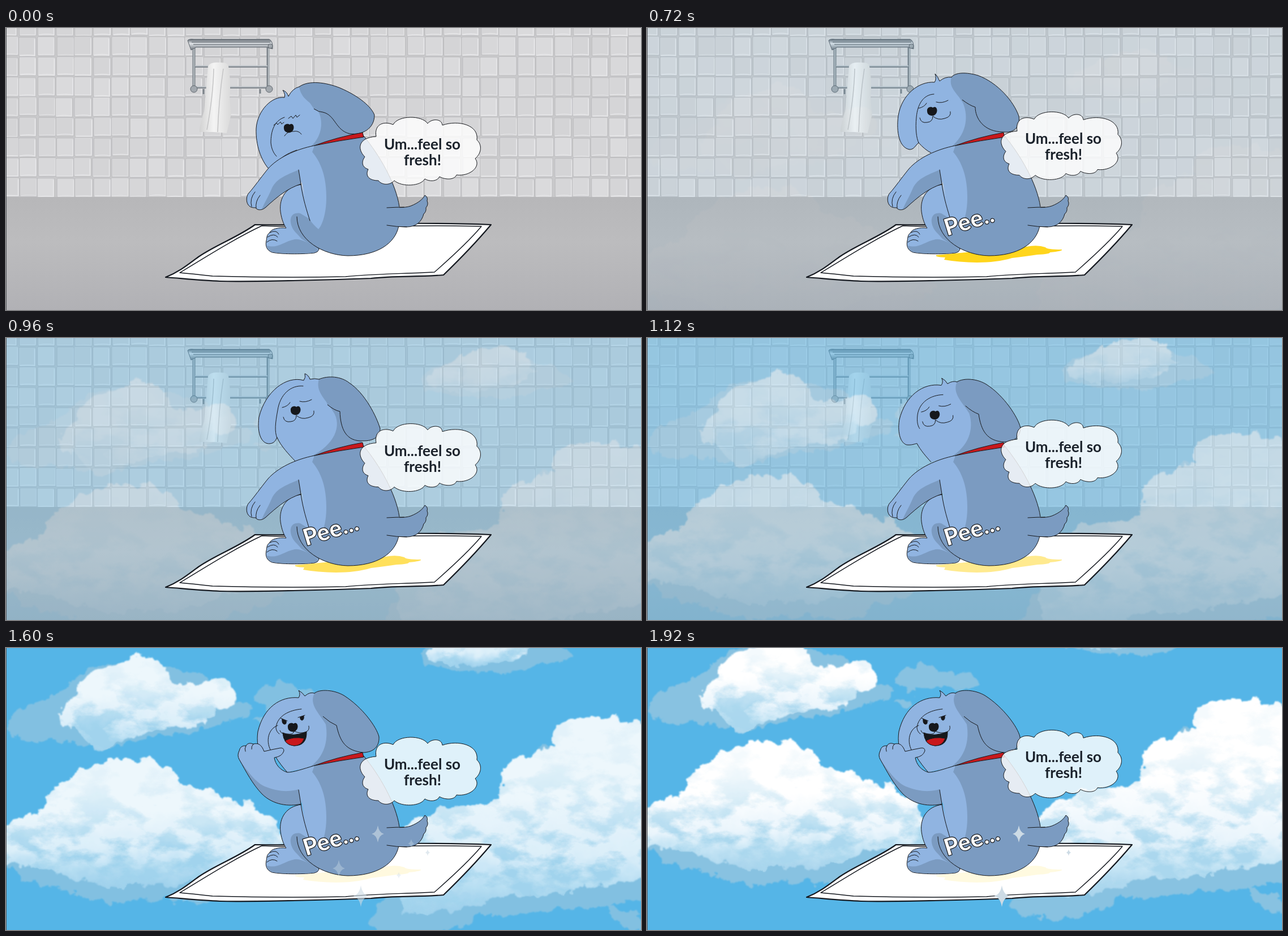
Write an HTML page that moves like this. It is 1122x499 px and loops after 2 s.

```html
<!DOCTYPE html>
<html lang="en">
<head>
<meta charset="utf-8">
<title>So fresh</title>
<style>
  html, body { margin: 0; width: 100%; height: 100%; overflow: hidden; background: #d8d8da; }
  svg { display: block; width: 100%; height: 100%; }
  text { font-family: Lato, "Open Sans", sans-serif; font-weight: 700; }
  .ink { fill: none; stroke: #16181c; stroke-width: 1; stroke-linecap: round; stroke-linejoin: round; }
  .light { fill: #90b4e1; }
  .dark { fill: #7b9bc1; }
  .both { stroke: #16181c; stroke-width: 1; stroke-linejoin: round; }
</style>
</head>
<body>
<svg viewBox="0 0 1122 499" preserveAspectRatio="none">
  <defs>
    <linearGradient id="floor" x1="0" y1="0" x2="0" y2="1">
      <stop offset="0" stop-color="#b7b7b9"/><stop offset=".4" stop-color="#bcbcbe"/><stop offset="1" stop-color="#b1b1b5"/>
    </linearGradient>
    <linearGradient id="chrome" x1="0" y1="0" x2="0" y2="1">
      <stop offset="0" stop-color="#5f666e"/><stop offset=".4" stop-color="#dfe3e7"/><stop offset="1" stop-color="#6d747c"/>
    </linearGradient>
    <linearGradient id="towel">
      <stop offset="0" stop-color="#d2d2d2"/><stop offset=".45" stop-color="#f4f4f4"/><stop offset="1" stop-color="#d9d9d9"/>
    </linearGradient>
    <linearGradient id="puff" x1="0" y1="0" x2="0" y2="1">
      <stop offset=".4" stop-color="#fff"/><stop offset=".7" stop-color="#eaf5fc"/><stop offset=".85" stop-color="#c2e3f4"/><stop offset="1" stop-color="#a6d3ec"/>
    </linearGradient>
    <linearGradient id="depth" x1="0" y1="0" x2="0" y2="1">
      <stop offset=".2" stop-opacity=".12"/><stop offset=".5" stop-opacity=".45"/><stop offset=".75" stop-opacity=".95"/>
    </linearGradient>
    <filter id="fluff" x="-10%" y="-20%" width="120%" height="140%" color-interpolation-filters="sRGB">
      <feTurbulence type="fractalNoise" baseFrequency=".045" numOctaves="4" seed="7"/>
      <feDisplacementMap in="SourceGraphic" scale="26" xChannelSelector="R" yChannelSelector="G"/>
      <feGaussianBlur stdDeviation=".9"/>
    </filter>
    <!-- Billowing blue shadows, kept inside the same ragged edge -->
    <filter id="billow" x="-10%" y="-20%" width="120%" height="140%" color-interpolation-filters="sRGB">
      <feTurbulence type="fractalNoise" baseFrequency=".045" numOctaves="4" seed="7"/>
      <feDisplacementMap in="SourceGraphic" scale="26" xChannelSelector="R" yChannelSelector="G" result="shape"/>
      <feTurbulence type="fractalNoise" baseFrequency=".016 .026" numOctaves="5" seed="21"/>
      <feColorMatrix values="0 0 0 0 .66  0 0 0 0 .84  0 0 0 0 .93  5 0 0 0 -2.2"/>
      <feComposite in2="shape" operator="in"/>
    </filter>
    <g id="puffs">
      <path d="M92 98C90 70 125 60 125 35C150 5 180 15 200-10C235-30 280-15 290 20C310 40 330 35 355 25C390 10 415 55 405 72C385 80 370 75 350 105C310 115 280 100 250 122C210 115 200 140 165 152C145 145 145 125 92 98Z"/>
      <path d="M-30 285C20 265 55 270 70 245C80 205 120 210 135 180C175 170 195 160 220 165C260 165 295 175 305 205C320 225 355 200 372 230C400 250 430 230 450 255C480 265 480 290 510 345C470 365 420 345 370 365C330 390 270 395 230 385C180 405 130 370 100 375C50 345 10 360-30 345Z"/>
      <path d="M690 300C715 262 750 270 765 256C800 243 835 258 862 240C880 225 875 205 885 185C890 150 940 165 967 140C955 105 1000 90 1020 97C1060 80 1100 105 1150 105V370C1080 400 1040 375 1000 400C940 415 890 395 850 420C810 440 770 430 700 440Z"/>
      <path d="M745-22C770-55 830-80 890-78C940-65 910-35 940-30C900-10 850 5 800 0Q755-5 745-22Z"/>
    </g>
  </defs>

  <g id="room">
    <rect width="1122" height="300" fill="#c9c9cb"/>
    <g id="tiles"></g>
    <rect y="299" width="1122" height="200" fill="url(#floor)"/>
    <g fill="none" stroke="#7d848b" stroke-width="5">
      <path d="M332 34V108M463 34V108"/>
      <path d="M333 68H463M333 105H463" stroke-width="4"/>
      <path d="M349 108V117M449 108V116" stroke-width="3"/>
      <path d="M332 36V108M464 36V108M334 67H462M334 104H462" stroke="#d5dade" stroke-width="1.3"/>
    </g>
    <path d="M321 22Q323 19 332 20L465 20Q472 23 471 37L461 34H336L327 39Z" fill="url(#chrome)" stroke="#5d646c"/>
    <path d="M328 25H467M331 29H465" stroke="#4f565e" stroke-width="1"/>
    <g fill="#a2a8ae" stroke="#60676e"><circle cx="332" cy="108" r="6"/><circle cx="465" cy="108" r="6"/><circle cx="467" cy="32" r="4"/></g>
    <path d="M357 67Q362 60 374 61Q392 60 393 67Q398 95 395 125L398 152L390 186L366 184L342 184Q341 175 350 148Z" fill="url(#towel)"/>
    <path d="M367 72Q366 120 355 180M384 72Q376 125 374 184" fill="none" stroke="#c3c3c4" stroke-width="1.5"/>
  </g>

  <g id="sky">
    <rect width="1122" height="499" fill="#55b5e7"/>
    <g id="clouds">
      <g filter="url(#fluff)" fill="#88c2e1">
        <path d="M5 105C25 55 75 70 100 45C140 0 210-25 290 5C330 25 390 10 410 60C450 75 430 105 390 95C340 130 270 120 215 135C160 165 120 120 70 135C30 140 0 125 5 105Z"/>
        <path d="M445 50C460 20 500 20 520 40C560 40 595 55 590 72C550 78 500 60 470 80Q435 65 445 50ZM440 95Q460 80 470 95Q460 105 440 95Z"/>
        <path d="M-30 330H500C500 390 400 380 380 410C310 435 270 400 220 415C160 435 120 395 70 390C30 380-10 350-30 330Z"/>
        <path d="M850 250C910 210 920 150 965 140L1150 130V400C1080 420 1050 440 1000 430C930 430 880 450 840 440C800 475 700 490 650 465C630 440 690 420 700 300Z"/>
        <path d="M728-15C760-60 870-95 930-55C970-45 1000-30 1000-12C930 0 890 18 840 15C790 8 750 5 728-15Z"/>
        <path d="M1060 425Q1090 430 1122 445V470Q1080 465 1060 425Z"/>
      </g>
      <use href="#puffs" fill="url(#puff)" filter="url(#fluff)"/>
      <use href="#puffs" fill="url(#depth)" filter="url(#billow)"/>
    </g>
  </g>

  <g stroke="#14181f" stroke-linejoin="round">
    <path fill="#fff" stroke-width="2.2" d="M282 441C305 432 320 420 340 405C370 384 410 370 440 348C580 350 700 342 857 348C836 373 804 407 773 437C720 441 690 438 645 443C540 447 420 449 378 448C345 447 310 443 282 441Z"/>
    <path fill="none" stroke-width="1.4" d="M307 433C350 407 405 372 452 350C600 355 720 347 840 351C820 375 790 403 757 432C700 435 650 435 600 440C500 442 400 440 365 439Q330 435 307 433Z"/>
  </g>
  <path id="puddle" fill="#ffd51c" d="M511 402L670 387Q690 383 704 388Q706 392 733 392Q735 395 712 397Q712 400 690 401Q670 404 645 407C610 418 560 416 525 410L527 406Q508 405 511 402Z"/>

  <g>
    <path class="dark both" d="M673 318C690 317 703 319 715 315C730 309 737 302 740 296Q746 299 744 306Q747 312 742 318Q743 325 738 329C735 342 725 352 708 352Q690 352 673 349"/>
    <path class="light" id="head"/>
    <path class="dark" id="shade"/>
    <path class="dark both" id="ear"/>
    <path class="ink" id="headLine"/>
    <path class="ink" id="muzzle"/>
    <g id="face">
      <g id="strain" class="ink">
        <path d="M-27-5l5-4l2 3l5-5l2 4l4-3M-1-17l5-4l3 4l5-6l2 4l5-4"/>
        <path id="frown" d="M-8 14Q-2 5 8 6Q17 4 22 11"/>
        <path id="flat" d="M-9 15Q-1 9 6 9Q14 6 22 2"/>
      </g>
      <path id="happy" class="ink" d="M-24-5Q-14-7-10-14M7-16Q17-13 28-19M-22 12Q-20 22-9 20Q1 19 1 9Q10 17 22 13Q34 10 32 1"/>
      <g id="grin" class="ink">
        <path d="M-22-16L-10-11M9-17L21-21M-27-3C-49 5-49 38-30 52"/>
        <path fill="#16181c" d="M-19-14L-12-11Q-11-5-15-5Q-20-6-19-14ZM13-18L19-20Q20-13 16-12Q12-13 13-18ZM-18 10Q0 18 24 8Q25 33 2 33Q-17 31-18 10Z"/>
        <path fill="#c8181c" d="M-14 24Q0 16 20 20Q15 33 2 33Q-10 32-14 24Z"/>
        <path d="M-23 6Q-20 14-10 12Q1 14 2 7Q12 12 22 9Q30 6 28-2"/>
      </g>
      <path fill="#16181c" d="M-9 0C-10-7-2-9 1-6C6-10 10-4 8 2C6 8 0 9-2 8C-7 7-9 4-9 0Z"/>
    </g>

    <path class="light both" d="M522 277C496 280 482 300 485 325C487 340 492 350 495 354C482 352 468 356 466 362C460 366 461 372 460 376C458 385 460 393 470 397C490 401 530 400 545 398Q551 397 553 392L540 340"/>
    <path class="dark" d="M520 328C500 324 498 346 511 361Q518 368 522 373L552 392L540 340ZM461 385C480 391 490 378 510 374Q525 372 552 393Q548 398 535 398.500Q490 400 470 396.500Q462 393 461 385Z"/>
    <path class="ink" d="M466 362Q478 356 482 365M462 370Q474 362 480 370M461 379Q470 371 479 377"/>
    <path class="dark" d="M545 208Q590 200 632 191C660 225 689 275 695 316L694 350C688 382 655 403 604 403C560 402 514 375 514 334Q520 328 538 341L518 250Z"/>
    <path class="ink" d="M632 191C660 225 689 275 695 316M694 350C688 382 655 403 604 403C560 402 514 375 514 334"/>
    <path class="dark" d="M673 318.500H703V351.500Q690 352 673 349Z"/>
    <path class="ink" d="M673 318Q690 317 703 317M673 349Q690 352 708 352"/>
    <path class="light" d="M500 222L532 210C560 235 566 270 566 300C566 330 558 350 552 356Q543 348 538 341C530 310 524 280 518 250Z"/>
    <g id="armDown">
      <path class="light" d="M545 208C510 215 480 230 463 249C450 265 438 282 430 291C424 296 424 308 428 313C432 318 436 318 441 318C444 323 452 323 458 318C480 298 497 284 521 276L534 240Z"/>
      <path class="dark" d="M517 251C490 262 478 268 470 283C464 298 455 312 452 321Q458 320 462 315C480 298 497 284 521 276Z"/>
      <path class="ink" d="M545 208C510 215 480 230 463 249C450 265 438 282 430 291C424 296 424 308 428 313C432 318 436 318 441 318C444 323 452 323 458 318C480 298 497 284 521 276M440 290Q430 302 434 316M449 296Q440 307 442 319"/>
    </g>
    <g id="armUp">
      <path class="light" d="M545 208C525 214 508 220 497 220C484 216 476 206 474 194Q488 192 491 182Q491 176 484 177Q468 180 456 183C452 172 446 167 437 170Q428 166 424 173Q414 172 412 182Q408 190 412 197C425 220 435 240 452 258C472 278 500 281 521 276L534 240Z"/>
      <path class="dark" d="M414 200C430 222 443 240 460 246Q490 258 517 250L521 276C500 281 472 278 452 258Q432 236 414 200Z"/>
      <path class="ink" d="M545 208C525 214 508 220 497 220C484 216 476 206 474 194Q488 192 491 182Q491 176 484 177Q468 180 456 183C452 172 446 167 437 170Q428 166 424 173Q414 172 412 182Q408 190 412 197C425 220 435 240 452 258C472 278 500 281 521 276M424 173Q421 178 423 183M437 170Q433 174 434 179"/>
    </g>
    <path class="ink" d="M517 251L521 276C524 300 532 325 537 341"/>
    <path fill="#c8181c" class="both" d="M545 208Q585 193 630 185L632 193Q590 199 545 208Z"/>
  </g>

  <text id="pee" transform="translate(530 368) rotate(-17)" font-size="41" letter-spacing=".5" fill="#fff" stroke="#16181c" stroke-width="2.4" stroke-linejoin="round" paint-order="stroke"></text>
  <g id="sparkles" fill="#cddbe5"></g>
  <g id="bubble">
    <path fill="#fff" fill-opacity=".81" class="both" d="M654 192C650 170 668 164 684 171C693 154 735 154 745 169C752 160 770 160 771 172C800 162 836 172 832 198C842 207 840 222 829 231C840 245 820 263 796 260C792 270 774 268 766 263C762 272 748 272 740 267C733 280 700 282 686 270C678 279 664 278 658 270C642 270 634 262 640 250C628 246 628 236 634 228C620 214 622 194 654 192Z"/>
    <g font-size="26" fill="#1b222b" text-anchor="middle"><text x="735.500" y="215">Um...feel so</text><text x="736" y="243">fresh!</text></g>
  </g>
  <rect width="1" height="499" fill="#55585c"/>
</svg>
<script>
const LOOP = 2000, STEP = 80;
const $ = id => document.getElementById(id);
const clamp = v => Math.max(0, Math.min(1, v));
const mix = (a, b, k) => a + (b - a) * k;

// Slightly uneven glazed wall tiles
let seed = 11;
const rand = () => (seed = seed * 16807 % 2147483647) / 2147483647;
let tiles = '';
for (let row = 0; row < 9; row++) for (let col = -1; col < 35; col++) {
  const x = col * 32.6 + 22 + rand() * 3, y = row * 35.7 - 21 + rand() * 2, g = 212 + rand() * 8 | 0;
  const w = 30 + rand() * 2, h = 33 + rand() * 1.5;
  tiles += `<rect x="${x}" y="${y}" width="${w}" height="${h}" rx="2" fill="rgb(${g},${g},${g + 2})" stroke="#b9b9bc" stroke-width=".8"/>` +
    `<path d="M${x + 2} ${y + h - 2}q${w / 2} ${-3 * rand()} ${w - 4} 0V${y + 3}" fill="none" stroke="#e6e6e8" stroke-width="${.6 + rand() * 1.6}"/>`;
}
$('tiles').innerHTML = tiles;

// Each sparkle: x, y, radius; the first three fade out as the others fade in
const sparkles = [[588, 390, 15], [716, 346, 8], [694, 402, 6], [657, 329, 15], [745, 362, 6], [627, 439, 19]];
$('sparkles').innerHTML = sparkles.map(([x, y, r]) => {
  const w = r * .72, c = r * .14;
  return `<path d="M${x} ${y - r}Q${x + c} ${y - c} ${x + w} ${y}Q${x + c} ${y + c} ${x} ${y + r}Q${x - c} ${y + c} ${x - w} ${y}Q${x - c} ${y - c} ${x} ${y - r}Z"/>`;
}).join('');

const low = {
  head: 'M518 104 Q506 107 499 121 Q497 113 489 110 Q494 117 492 123 C470 120 444 146 442 178 C441 208 451 234 464 249 C470 245 475 240 480 236 C490 226 502 220 514 216',
  ear: 'M518 104 C535 92 565 96 590 106 C625 121 646 140 651 154 C651 178 630 190 607 187 C582 181 582 154 560 149 Q553 149 544 143',
  shade: 'M518 104 C522 130 545 132 554 152 C562 175 553 198 538 210',
  muzzle: 'M492 158 C474 164 468 182 468 203 C469 214 473 222 478 227',
  nose: '500 177'
};
const mid = {
  head: 'M538 87 Q526 86 517 94 Q514 86 509 81 Q512 90 508 96 C480 94 450 118 444 155 C440 185 446 212 464 215 C472 215 474 208 480 203 C486 210 494 217 502 221',
  ear: 'M538 87 C545 78 565 78 585 84 C620 97 648 130 657 156 C660 176 648 186 630 184 C595 184 580 160 580 140 Q570 137 557 127',
  shade: 'M538 87 C532 105 548 115 558 132 C570 160 562 190 538 210',
  muzzle: 'M507 117 C488 118 478 135 476 158 C474 178 476 195 480 203',
  nose: '504 147'
};
const high = {
  head: 'M553 73 Q546 71 537 73 Q535 66 528 63 Q530 70 526 75 C495 66 458 95 447 140 C443 170 452 188 466 187 C474 186 476 182 479 176 C486 192 500 206 511 218',
  ear: 'M553 73 C570 66 592 68 606 79 C635 98 655 140 661 160 C661 176 648 182 632 182 C600 184 591 160 590 130 Q580 128 568 118',
  shade: 'M553 73 C546 95 566 110 578 130 C595 155 580 190 538 210',
  muzzle: 'M525 85 C503 83 484 100 480 128 C476 150 474 165 479 177',
  nose: '512 128'
};
const proud = {
  head: 'M545 80 Q537 77 528 85 Q524 79 517 75 Q521 82 517 88 C485 85 455 105 445 148 C442 170 447 185 455 190 C465 192 472 190 476 192 C482 202 490 212 497 220',
  ear: 'M545 80 C555 72 580 74 597 84 C630 105 655 140 659 157 C660 176 648 184 632 185 C600 182 590 165 584 137 Q572 132 560 121',
  shade: 'M545 80 C535 100 553 115 565 135 C570 165 562 192 538 210',
  muzzle: 'M522 108 C500 110 480 120 477 140 C477 146 480 150 483 152',
  nose: '507 140'
};
const poses = [[0, low], [480, low], [720, mid], [960, high], [1200, proud], [LOOP, proud]];
const puddle = [[0, 0], [160, 0], [320, .14], [640, 1], [720, 1], [960, .72], [1360, .15], [LOOP, .13]];

function span(keys, t) {
  const i = Math.max(1, keys.findIndex(k => k[0] > t));
  const [t0, a] = keys[i - 1], [t1, b] = keys[i];
  return [a, b, (t - t0) / (t1 - t0)];
}
function morph(a, b, k) {
  const to = b.match(/\d+/g);
  let i = 0;
  return a.replace(/\d+/g, n => mix(+n, +to[i++], k).toFixed(1));
}
const show = (id, on) => $(id).style.display = on ? '' : 'none';
const fade = (id, v) => $(id).setAttribute('opacity', v);

function draw(t) {
  const [a, b, k] = span(poses, t);
  const part = name => morph(a[name], b[name], k);
  const head = part('head');
  $('headLine').setAttribute('d', head);
  $('head').setAttribute('d', head + 'L545 208L630 188L600 130Z');
  $('shade').setAttribute('d', part('shade') + 'L632 190L600 130Z');
  $('ear').setAttribute('d', part('ear'));
  $('muzzle').setAttribute('d', part('muzzle'));
  $('face').setAttribute('transform', `translate(${part('nose')})`);

  const up = t >= 1200;
  show('strain', t < 600);
  show('frown', t < 240);
  show('flat', t >= 240);
  show('happy', t >= 600 && !up);
  show('grin', up);
  show('armUp', up);
  show('armDown', !up);

  fade('sky', clamp((t - 640) / 960));
  fade('clouds', mix(.25, 1, clamp((t - 640) / 1120)));
  $('clouds').setAttribute('transform', `translate(0 ${(1920 - t) * .098})`);
  fade('puddle', mix(...span(puddle, t)));

  $('pee').textContent = 'Pee...'.slice(0, Math.floor(t / 136));
  const bob = t / STEP % 10;
  $('bubble').setAttribute('transform', `translate(0 ${-3.2 * Math.min(bob, 12 - bob)})`);

  [...$('sparkles').children].forEach((star, i) => {
    const v = i < 3 ? Math.min(clamp((t - 1200) / 160), clamp((1760 - t) / 400)) : clamp((t - 1280) / 520);
    star.setAttribute('opacity', v);
  });
}

const start = performance.now();
function tick(now) {
  const t = Math.max(0, now - start) % LOOP;
  draw(Math.floor(t / STEP) * STEP);
  requestAnimationFrame(tick);
}
draw(0);
requestAnimationFrame(tick);
</script>
</body>
</html>
```
